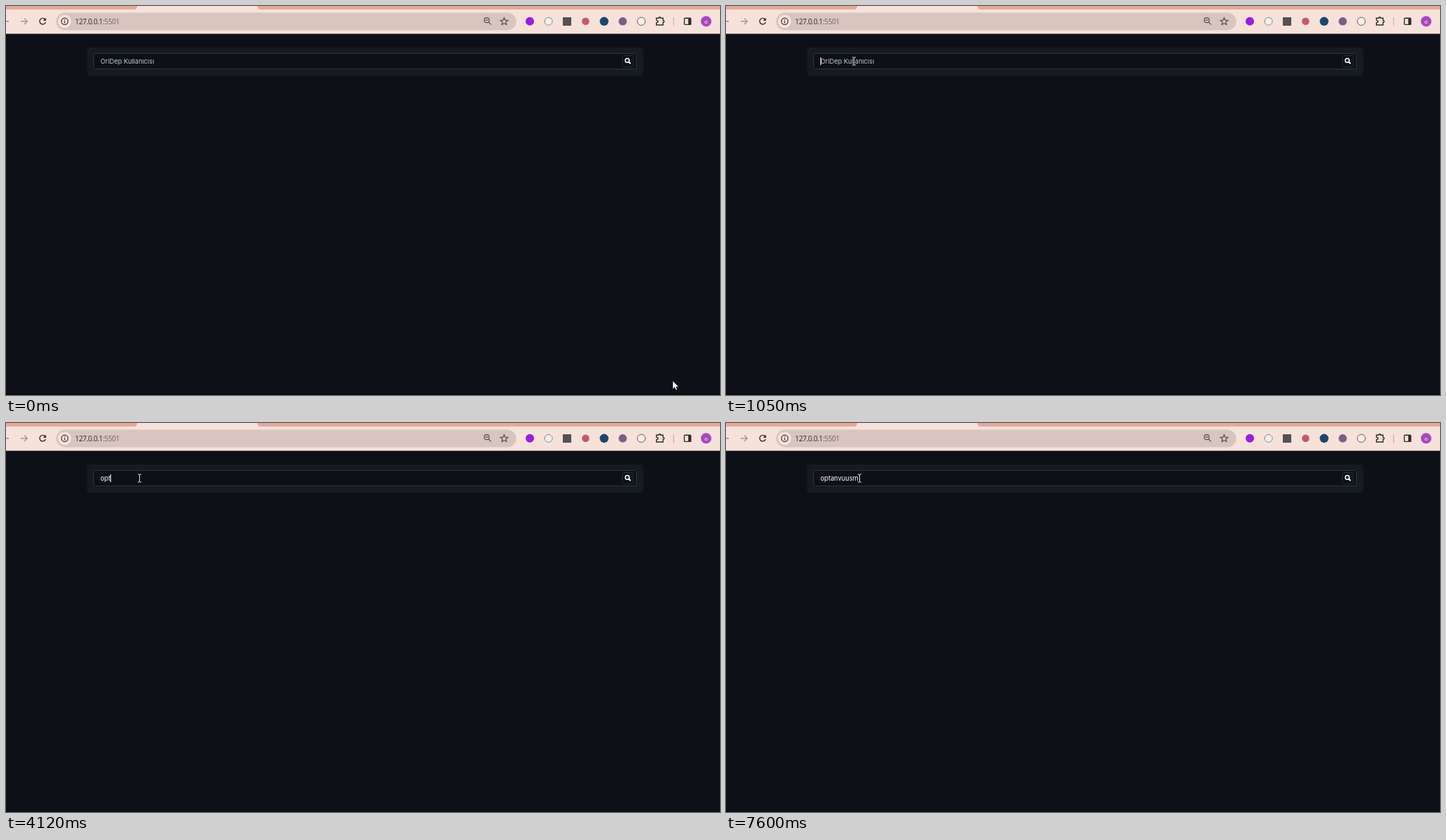
Animation of 1013 by 553 pixels, one loop 8000 ms. Source, as an HTML page:

```html
<!DOCTYPE html>
<html lang="tr">
<head>
<meta charset="utf-8">
<title>Kullanıcı arama</title>
<style>
html, body { margin: 0; width: 100%; height: 100%; overflow: hidden; background: #0d1117; }
svg { display: block; }
.field { font: 9.2px Inter, sans-serif; }
.url { font: 10px "Open Sans", "Noto Sans", sans-serif; letter-spacing: -.34px; }
.line { fill: none; stroke: #332e2d; stroke-width: 1.4; }
</style>
</head>
<body>
<svg width="1013" height="553" viewBox="0 0 1013 553">
  <!-- browser bar -->
  <rect width="1013" height="39.5" fill="#f6e2db"/>
  <path d="M0 0H186V1Q186 5 181 5H0ZM357 0H1013V5H362Q357 5 357 1Z" fill="#e5a998"/>
  <path class="line" d="M0 21.8H4" style="stroke:#8d8380"/>
  <path class="line" d="M21 21.8H30M26 17.6L30.2 21.8 26 26" style="stroke:#978b87;stroke-width:1.2"/>
  <path class="line" d="M55.6 19.2A4.3 4.3 0 1 0 56.2 23"/>
  <path d="M56.8 16.8V21H52.6Z" fill="#332e2d"/>
  <rect x="71" y="9.5" width="653" height="25" rx="12.5" fill="#d8c5bf"/>
  <circle cx="83.3" cy="21.8" r="9.3" fill="#f6e2db"/>
  <circle class="line" cx="83.3" cy="21.8" r="4.7" style="stroke-width:1.2"/>
  <path class="line" d="M83.3 21.2V24.5M83.3 18.9V20.2" style="stroke-width:1.2"/>
  <text class="url" x="98" y="25.5" fill="#2c2827">127.0.0.1<tspan fill="#6d6461">:5501</tspan></text>
  <g class="line" style="stroke:#554d4a;stroke-width:1.2">
    <circle cx="682" cy="20.2" r="3.5"/>
    <path d="M684.6 22.8L688.3 26.6M680.2 20.2H683.8"/>
    <path d="M706.8 16.8L708.3 20.2 712 20.5 709.2 22.9 710.1 26.5 706.8 24.6 703.5 26.5 704.4 22.9 701.6 20.5 705.3 20.2Z"/>
  </g>
  <circle cx="743.2" cy="21.8" r="6" fill="#9b20d9"/>
  <circle cx="769.7" cy="21.8" r="5.5" fill="#f5efed" stroke="#8b8583"/>
  <rect x="790" y="16" width="12" height="12" fill="#565252"/>
  <circle cx="822.3" cy="21.8" r="5.3" fill="#c45872"/>
  <circle cx="848.6" cy="21.8" r="6.2" fill="#1c4669"/>
  <circle cx="875" cy="21.8" r="5.8" fill="#76617e"/>
  <circle cx="901.4" cy="21.8" r="5.6" fill="#f8f1ef" stroke="#5c5654"/>
  <path class="line" d="M922.7 17.3H926.2Q926 15.8 927.5 15.8T928.8 17.3H932.2V20.5Q933.8 20.3 933.8 21.8T932.2 23.2V27H922.7V23.6Q925 23.6 925 22T922.7 20.4Z"/>
  <path d="M947.3 16V28" stroke="#e5a998" stroke-width="1.3"/>
  <rect class="line" x="962.4" y="17.2" width="9.2" height="9.2" rx=".8"/>
  <path d="M968 17H972V27H968Z" fill="#332e2d"/>
  <circle cx="993.3" cy="21.8" r="7.5" fill="#aa47bc"/>
  <text x="993.3" y="24.5" text-anchor="middle" fill="#fff" style="font:8px Roboto,sans-serif">o</text>

  <!-- page -->
  <rect x="115" y="59" width="789" height="40" rx="4" fill="#161b22"/>
  <rect x="124.5" y="67.5" width="770" height="22" rx="2" fill="#0d1117" stroke="#30363d"/>
  <rect x="874.5" y="70.5" width="15.5" height="16" rx="2" fill="#0d1117" stroke="#272d35"/>
  <circle cx="881.4" cy="77.4" r="2.8" fill="none" stroke="#fff" stroke-width="1.5"/>
  <path d="M883.5 79.5L886.2 82.2" stroke="#fff" stroke-width="1.8"/>
  <rect y="552" width="1013" height="1" fill="#07090c"/>
  <text class="field" id="hint" x="134" y="82" fill="#c3c9d0">OrlDep Kullanıcısı</text>
  <text class="field" id="typed" x="134" y="82" fill="#fff"></text>
  <rect id="caret" y="73" width="1" height="11" fill="#fff"/>
  <path id="arrow" d="M0 0V11.5L2.7 9 4.5 13 6.4 12.2 4.7 8.3H8.2Z" fill="#fff" stroke="#08090c" stroke-width=".5"/>
  <path id="beam" d="M-2.5 -5.5H-.6L0 -5 .6 -5.5H2.5M0 -5V5M-2.5 5.5H-.6L0 5 .6 5.5H2.5" fill="none" stroke="#e8e8e8"/>
</svg>
<script>
const LOOP = 8000;
const NAME = "optanvuusm";
const KEYS = [2250, 2600, 2870, 4760, 5130, 5530, 5810, 6480, 6680, 7080];
const BLINKS = [930, 1450, 2000, 3400, 4120, 4470, 4760, 6280, 6480, 7600];
// time, x, y of the pointer
const PATH = [[0, 946, 533], [390, 142, 96], [630, 146, 94], [870, 160, 87], [1030, 182, 78], [1110, 190, 78]];

const [hint, typed, caret, arrow, beam] =
  ["hint", "typed", "caret", "arrow", "beam"].map(id => document.getElementById(id));
const passed = (times, t) => times.filter(at => at <= t).length;
const show = (node, on) => node.setAttribute("visibility", on ? "visible" : "hidden");

function pointerAt(t) {
  const i = PATH.findIndex(p => p[0] > t);
  if (i < 0) return PATH[PATH.length - 1].slice(1);
  const [t0, x0, y0] = PATH[i - 1], [t1, x1, y1] = PATH[i];
  let k = (t - t0) / (t1 - t0);
  if (i === 1) k = k * k * (3 - 2 * k);
  return [x0 + (x1 - x0) * k, y0 + (y1 - y0) * k];
}

function draw(t) {
  const count = passed(KEYS, t);
  typed.textContent = NAME.slice(0, count);
  show(hint, !count);
  show(caret, passed(BLINKS, t) % 2);
  caret.setAttribute("x", 134 + Math.round(count ? typed.getComputedTextLength() : 0));

  // the pointer is sampled every 80 ms
  const [x, y] = pointerAt(Math.max(0, Math.floor((t + 10) / 80) * 80 - 10));
  const inField = y < 89;
  show(arrow, !inField);
  show(beam, inField);
  const place = `translate(${Math.round(x)} ${Math.round(y)})`;
  arrow.setAttribute("transform", place);
  beam.setAttribute("transform", `${place} translate(-.5 .5)`);
}

const start = performance.now();
function tick() {
  draw((performance.now() - start) % LOOP);
  requestAnimationFrame(tick);
}
tick();
</script>
</body>
</html>
```
